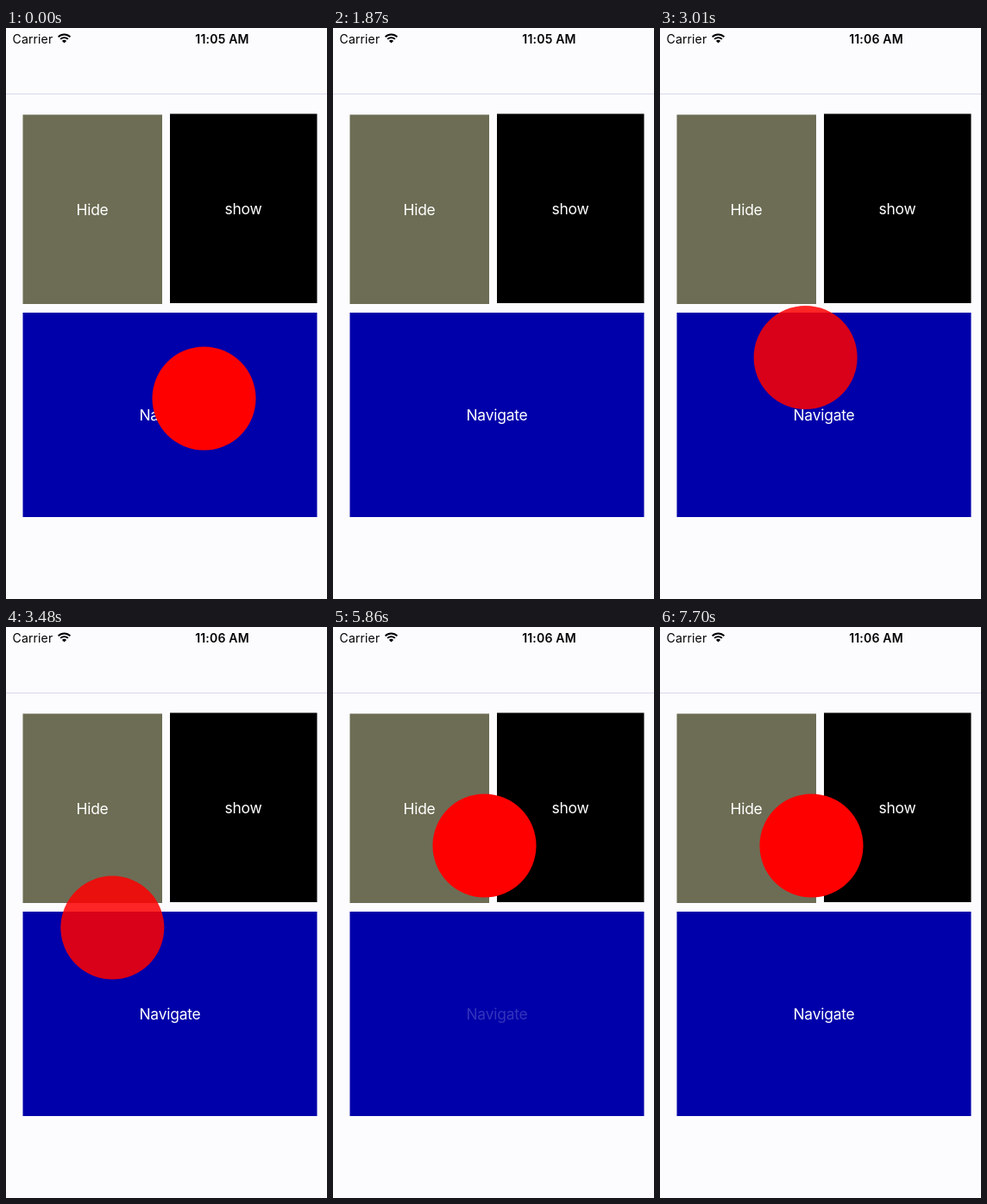
Animation of 372x662 px, one loop 8 s. Source, as an HTML page:

```html
<!DOCTYPE html>
<html lang="en">
<head>
<meta charset="utf-8">
<title>Floating button</title>
<style>
  html, body { margin: 0; width: 100%; height: 100%; overflow: hidden; background: #fcfcff; }
  svg { display: block; width: 372px; height: 662px; }
  text { font-family: Inter, Roboto, "Liberation Sans", sans-serif; }
  .label { font-size: 17.4px; letter-spacing: -.2px; fill: #fff; text-anchor: middle; }
  .status { font-size: 14px; fill: #000; letter-spacing: .15px; }
  #clock { font-weight: 600; letter-spacing: .2px; text-anchor: middle; }
</style>
</head>
<body>
<svg viewBox="0 0 372 662">
  <rect width="372" height="662" fill="#fcfcff"/>
  <g id="home">
    <rect x="19.5" y="100.5" width="161.5" height="219.5" fill="#6d6d55"/>
    <rect x="190" y="99.5" width="170.5" height="219.5" fill="#000"/>
    <rect x="19.5" y="330" width="341" height="237" fill="#0000aa"/>
    <text class="label" x="100" y="217">Hide</text>
    <text class="label" x="275" y="216">show</text>
    <text class="label" id="navigate" x="190" y="455">Navigate</text>
  </g>
  <rect id="shade" width="372" height="662" fill="#000" opacity="0"/>
  <rect id="next" width="372" height="662" fill="#fcfcff"/>

  <rect width="372" height="76" fill="#fcfcff"/>
  <path d="M0 76.5H372" stroke="#d9d9ee"/>
  <text class="status" x="7.5" y="17.5">Carrier</text>
  <g fill="none" stroke="#000" stroke-width="1.9">
    <path d="M60.6 10.3A9.8 9.8 0 0 1 74.4 10.3"/>
    <path d="M63.1 12.9A6.3 6.3 0 0 1 71.9 12.9"/>
  </g>
  <path d="M67.5 17.6L64.9 15A3.7 3.7 0 0 1 70.1 15Z"/>
  <text class="status" id="clock" x="250.5" y="17.5">11:05 AM</text>
  <circle id="ball" r="60" fill="#f00"/>
</svg>
<script>
const LOOP = 8000, WIDTH = 372;
const $ = id => document.getElementById(id);
const home = $('home'), shade = $('shade'), next = $('next');
const label = $('navigate'), clock = $('clock'), ball = $('ball');

// time, x, y of the dragged ball
const drag = [
  [0, 229.5, 429.5], [500, 229.5, 429.5], [640, 281, 392], [870, 235, 309.3],
  [1050, 137, 260], [1270, 172, 300], [1330, 172, 300], [1480, 160, 359],
  [1680, 250, 172], [1870, 440, 215], [2140, 440, 470], [2380, 350, 536],
  [2580, 297, 493.5], [2780, 107, 420], [2940, 160, 370], [2980, 160, 370],
  [3200, 320, 593], [3480, 123.3, 349.5], [3620, 165, 223], [3780, 239, 290],
  [3820, 239, 290], [3980, 205, 353], [4150, 145, 300], [4320, 190, 236],
  [4450, 175.5, 253.5], [LOOP, 175.5, 253.5]
];

const clamp = v => Math.max(0, Math.min(1, v));
const ramp = (t, from, to) => clamp((t - from) / (to - from));
const easeOut = p => 1 - (1 - p) ** 3;
const glide = p => p * p * (3 - 2 * p) * .35 + easeOut(p) * .65;

function slope(i, axis) {
  if (i < 1 || i > drag.length - 2) return 0;
  const rate = k => (drag[k + 1][axis] - drag[k][axis]) / (drag[k + 1][0] - drag[k][0]);
  const a = rate(i - 1), b = rate(i);
  return a * b <= 0 ? 0 : 2 * a * b / (a + b);
}

// Monotone Hermite curve: never overshoots its points
function along(t, axis) {
  let i = 0;
  while (i < drag.length - 2 && t >= drag[i + 1][0]) i++;
  const a = drag[i], b = drag[i + 1], span = b[0] - a[0];
  const u = (t - a[0]) / span, s = u * u * (3 - 2 * u);
  return a[axis] * (1 - s) + b[axis] * s
    + span * u * (1 - u) * (slope(i, axis) * (1 - u) - slope(i + 1, axis) * u);
}

function render(t) {
  ball.setAttribute('cx', along(t, 1));
  ball.setAttribute('cy', along(t, 2));
  ball.setAttribute('opacity', 1 - .15 * (ramp(t, 500, 560) - ramp(t, 4350, 4450)));

  clock.textContent = t < 2140 ? '11:05 AM' : '11:06 AM';

  const pressed = t >= 5860 && t < 6300;
  label.setAttribute('opacity', pressed ? .2 + .8 * ramp(t, 5920, 6200) : 1);

  const push = glide(ramp(t, 5890, 6460)) - glide(ramp(t, 7100, 7700));
  home.setAttribute('transform', `translate(${-.3 * WIDTH * push} 0)`);
  shade.setAttribute('opacity', .1 * push);
  next.setAttribute('x', WIDTH * (1 - push));
}

const start = performance.now();
function tick() {
  render((performance.now() - start) % LOOP);
  requestAnimationFrame(tick);
}
tick();
</script>
</body>
</html>
```
